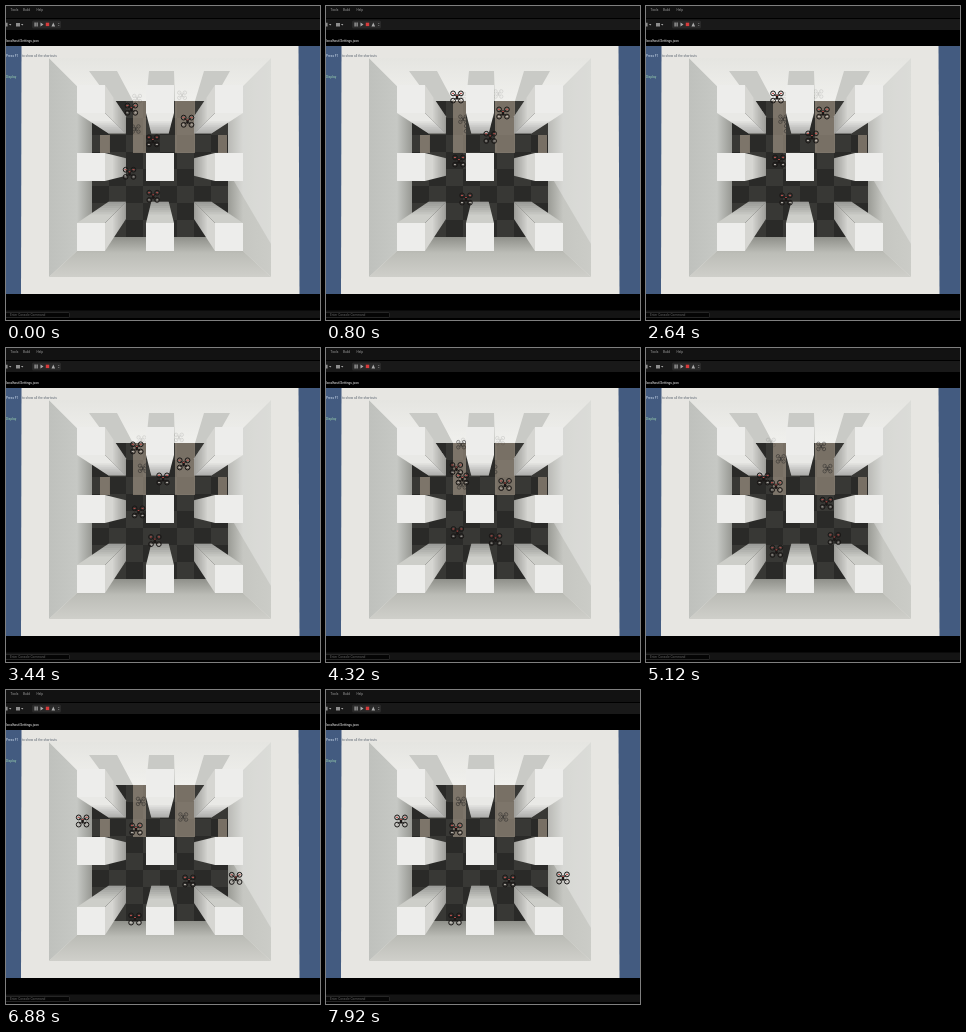
Recreate the animation shown at these times as an HTML page. Size 314 by 314 pixels, loop 8 s.

```html
<!DOCTYPE html>
<html lang="en">
<head>
<meta charset="utf-8">
<title>Drone arena</title>
<style>
  html, body { margin: 0; width: 100%; height: 100%; overflow: hidden; background: #000; }
  svg { display: block; width: 100vw; height: 100vh; }
  text { font: 3.2px Roboto, sans-serif; }
</style>
</head>
<body>
<svg viewBox="0 0 314 314">
  <defs>
    <linearGradient id="left"><stop stop-color="#bfc1bd"/><stop offset=".65" stop-color="#c6c8c4"/><stop offset="1" stop-color="#979893"/></linearGradient>
    <linearGradient id="right"><stop stop-color="#9a9b95"/><stop offset=".35" stop-color="#c6c7c2"/><stop offset="1" stop-color="#cbccc7"/></linearGradient>
    <linearGradient id="back" x2="0" y2="1"><stop stop-color="#e5e5e1"/><stop offset="1" stop-color="#f0f0ed"/></linearGradient>
    <linearGradient id="front" x2="0" y2="1"><stop stop-color="#8f908a"/><stop offset=".4" stop-color="#bcbdb7"/><stop offset="1" stop-color="#cfcfca"/></linearGradient>
    <pattern id="tiles" x="86" y="95" width="34" height="34" patternUnits="userSpaceOnUse">
      <path fill="#2a2a28" d="M0 0h34v34H0z"/>
      <path fill="#383835" d="M0 0h17v17H0zM17 17h17v17H17z"/>
    </pattern>
    <path id="lit" d="M127 95h13v52h-13zM169 95h20v52h-20zM94 129h10v18h-10zM212 129h9v18h-9z"/>
    <clipPath id="sunny"><use href="#lit"/><path d="M43 52h222v43H43z"/></clipPath>
    <g id="frame" fill="none" stroke="currentColor">
      <path d="M-3.9-3.6L3.9 3.6M-3.9 3.6L3.9-3.6" stroke-width=".8"/>
      <path d="M0-2.5v5" stroke-width="2.2"/>
      <g id="rotors">
        <circle cx="-3.9" cy="-3.6" r="2.4"/><circle cx="3.9" cy="-3.6" r="2.4"/>
        <circle cx="-3.9" cy="3.6" r="2.4"/><circle cx="3.9" cy="3.6" r="2.4"/>
      </g>
    </g>
    <g id="drone">
      <use href="#frame" color="#1a1716"/>
      <path d="M-5-3.6h2M3-3.6h2M-.8-1.5h1.6" stroke="#c4504c" stroke-width="1"/>
      <path d="M-5 3.6h2M3 3.6h2" stroke="#cfc7c1" stroke-width=".9"/>
    </g>
  </defs>

  <path fill="#121212" d="M0 0h314v12H0z"/>
  <path fill="#191919" d="M0 13h314v11H0z"/>
  <g fill="#a0a0a0">
    <text x="4.5" y="5.2">Tools</text><text x="17" y="5.2">Build</text><text x="30.5" y="5.2">Help</text>
  </g>
  <rect x="26" y="14.5" width="29" height="8" rx="1.5" fill="#292929"/>
  <g fill="#aaa">
    <path d="M28.5 16.5h1.2v4h-1.2zM30.5 16.5h1.2v4h-1.2zM34.5 16.5l3 2-3 2zM45.5 20.5l1.8-4 1.8 4zM52.4 17h.8v.8h-.8zM52.4 19h.8v.8h-.8zM3 18h2.4l-1.2 1.4zM15 18h2.4l-1.2 1.4z"/>
    <path d="M10 17h4v3.4h-4zM0 16.8h1.6v3.6H0z" opacity=".8"/>
  </g>
  <rect x="39.8" y="16.7" width="3.4" height="3.4" fill="#d63b3b"/>

  <path fill="#435b80" d="M0 40h314v248H0z"/>
  <path fill="#e7e6e2" d="M15.5 40h277L293.5 288H15z"/>
  <path fill="url(#left)" d="M43 52L86 95V231L43 271z"/>
  <path fill="url(#right)" d="M265 52L222 95V231L265 271z"/>
  <path fill="#fff" opacity=".3" d="M222 165L265 238V52L222 95z"/>
  <path fill="url(#back)" d="M43 52H265L222 95H86z"/>
  <path fill="url(#front)" d="M43 271H265L222 231H86z"/>
  <path fill="#c9cac6" d="M83 65h28L127 95h-22zM143 65h25L169 95h-29zM198 65h26L207 95h-18z"/>
  <path fill="url(#tiles)" d="M86 95h136v136H86z"/>
  <use href="#lit" fill="#a99c8c" opacity=".62"/>

  <g id="shades" clip-path="url(#sunny)"></g>
  <g id="pillars"></g>
  <g id="drones"></g>

  <text x="0" y="36" fill="#fff">localhost/Settings.json</text>
  <text x="0" y="50.5" fill="#d5e3f2">Press F1</text>
  <text x="16" y="50.5" fill="#59636f">to show all the shortcuts</text>
  <text x="0" y="72.3" fill="#9fd8b0">Display</text>

  <path fill="#141414" d="M0 304.5h314v7.5H0z"/>
  <rect x="-1" y="306.5" width="64.5" height="5" rx="1" fill="#050505" stroke="#383838" stroke-width=".6"/>
  <text x="4" y="310.2" fill="#666">Enter Console Command</text>
</svg>
<script>
const LOOP = 8000, STEP = 80;
const cx = 154, cy = 161;          // view centre
const byId = id => document.getElementById(id);

// Point seen at (x, y) from the centre, scaled towards it with depth.
const toward = (x, y, scale) => [cx + x * scale, cy + y * scale];

// A pillar side runs from the top edge a-b down to the floor, darker near the floor.
function side(a, b, fill) {
  const band = (u, color) => {
    const s = 1 - 0.38 * u;
    const pts = [toward(...a, s), toward(...b, s), toward(...b, 0.62), toward(...a, 0.62)];
    return `<polygon points="${pts.join(' ')}" fill="${color}"/>`;
  };
  let out = band(0, fill);
  for (let u = 0.4; u < 0.95; u += 0.1) out += band(u, 'rgba(0,0,0,.045)');
  return out;
}

let blocks = '';
for (const y of [-68, 0, 70]) for (const x of [-69, 0, 69]) {
  const l = x - 14, r = x + 14, t = y - 14, b = y + 14;
  const inX = x < 0 ? r : l, inY = y < 0 ? b : t;
  if (x) blocks += side([inX, t], [inX, b], '#d6d6d2');
  if (y) blocks += side([l, inY], [r, inY], y < 0 ? '#e9e9e6' : '#cdcec9');
  blocks += `<rect x="${cx + l}" y="${cy + t}" width="28" height="28" fill="#ededeb"/>`;
}
byId('pillars').innerHTML = blocks;

// Each drone flies start -> turn, hovers, then turn -> goal; lift sets its shadow's offset.
const drones = [
  { start: [125, 104], turn: [131, 91], goal: [130, 139], lift: 32 },
  { start: [182, 116], turn: [177, 107], goal: [183, 191], lift: 58 },
  { start: [146, 135], turn: [166, 131], goal: [75, 131], lift: 45 },
  { start: [123, 168], turn: [133, 155], goal: [129, 229], lift: 43 },
  { start: [148, 190], turn: [140, 193], goal: [237, 188], lift: 64 }
];
const SPEED = 0.0235, RAMP = 300, DEPART = 2910;   // px/ms, ms, ms

// Constant cruise speed with a linear ramp at both ends.
const ramp = t => t < 0 ? 0 : t < RAMP ? t * t / (2 * RAMP) : t - RAMP / 2;
function fly(from, to, t) {
  const time = Math.hypot(to[0] - from[0], to[1] - from[1]) / SPEED;
  const u = (ramp(t) - ramp(t - time)) / time;
  return from.map((v, i) => v + (to[i] - v) * u);
}

const fill = (id, shape) => byId(id).innerHTML = drones.map(() => shape).join('');
fill('shades', '<use href="#frame" color="#222"/>');
fill('drones', '<use href="#drone"/>');

const place = (el, x, y, size) =>
  el.setAttribute('transform', `translate(${x.toFixed(2)} ${y.toFixed(2)}) scale(${size})`);

function draw(now) {
  const t = Math.floor(now % LOOP / STEP) * STEP;
  drones.forEach((d, i) => {
    const [x, y] = t < DEPART ? fly(d.start, d.turn, t + RAMP / 2) : fly(d.turn, d.goal, t - DEPART);
    place(byId('drones').children[i], x, y, 1);

    // The shadow falls on the floor, or foreshortened on the back wall.
    const shade = byId('shades').children[i];
    let [sx, sy] = toward(x - cx, y - cy, 0.8);
    sy -= d.lift;
    const onWall = sy < 95;
    if (onWall) sy = 95 - (95 - sy) * 0.2;
    place(shade, sx, sy, 0.72);
    shade.setAttribute('opacity', onWall ? 0.15 : 0.65);
  });
}

const start = performance.now();
function tick() {
  draw(performance.now() - start);
  requestAnimationFrame(tick);
}
tick();
</script>
</body>
</html>
```
